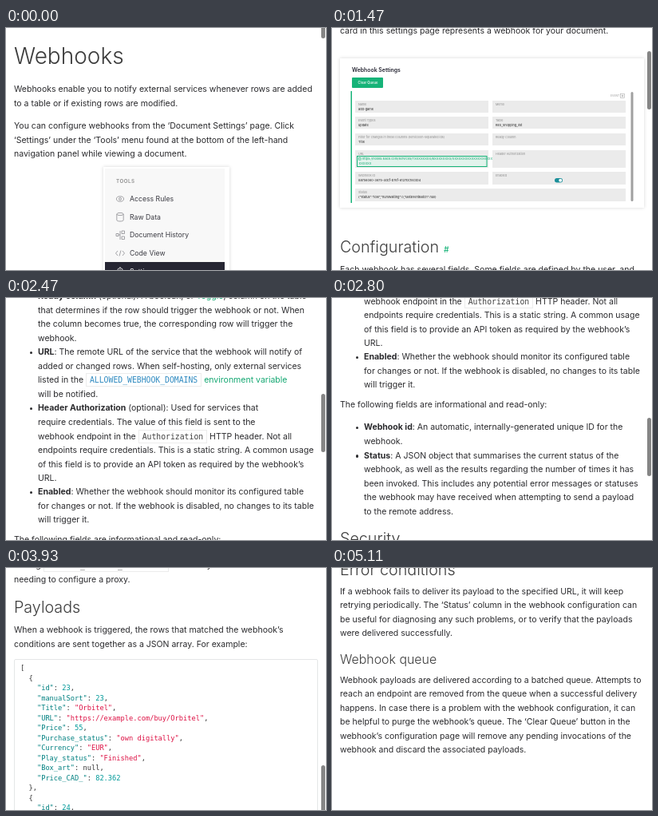
Recreate the animation shown at these times as an HTML page. Size 401 by 303 pixels, loop 5.22 s.

```html
<!DOCTYPE html>
<html lang="en">
<head>
<meta charset="utf-8">
<title>Webhooks</title>
<style>
html, body { margin: 0; width: 100%; height: 100%; overflow: hidden; background: #fff; }
#stage { position: relative; width: 401px; height: 303px; overflow: hidden; background: #fff;
  font: 10.52px/17.6px Inter, "Open Sans", sans-serif; color: #2b2b2e; }
#page { position: absolute; left: 0; top: 0; width: 401px; height: 2660px; will-change: transform; }
#page > * { position: absolute; }
.line { white-space: pre; height: 17.6px; }
.h1, .h2, .h3 { font-weight: 300; color: #3c3c3c; }
.h1 { font-size: 28px; }
.h2 { font-size: 19.7px; }
.h3 { font-size: 15.9px; }
.h2 i { font-size: 10px; font-weight: 500; margin-left: 6px; color: #16b378; }
b { font-weight: 700; }
a { color: #16a873; }
code { font: 9.77px/1 "DejaVu Sans Mono", monospace; color: #404040; padding: 2px 4px;
  border: 1px solid #ececec; background: #fff; }
a code { color: #2f8ac0; }
.dot { width: 3.4px; height: 3.4px; border-radius: 50%; background: #2b2b2e; }
.step { width: 19px; height: 19px; border: 1px solid #16b378; border-radius: 50%;
  color: #16a873; text-align: center; line-height: 19px; }
.pre { box-sizing: border-box; border: 1px solid #e4e6e7; border-radius: 2px; }
.json { font: 8.7px/12.5px "DejaVu Sans Mono", monospace; color: #333; white-space: pre; }
.key { color: #008080; }
.str { color: #d14; }
.num { color: #099; }
svg { overflow: visible; font-family: Inter, "Open Sans", sans-serif; }
.card { filter: drop-shadow(0 0 2px rgba(0,0,0,.16)); }
#thumb { position: absolute; left: 395px; top: 0; width: 5px; height: 73px; border-radius: 2.5px; background: #858585; }
</style>
</head>
<body>
<div id="stage"><div id="page"></div><div id="thumb"></div></div>
<script>
const page = document.getElementById('page');
const thumb = document.getElementById('thumb');
const STEP = 17.57;

function put(cls, left, top, html = '', size) {
  const el = document.createElement('div');
  el.className = cls;
  el.style.left = left + 'px';
  el.style.top = top + 'px';
  if (size) [el.style.width, el.style.height] = size.map(v => v + 'px');
  el.innerHTML = html;
  page.append(el);
}

// y is the vertical middle of the first line
function text(y, lines, x = 10) {
  lines.forEach((s, i) => put('line', x, y + i * STEP - 8.8, s));
}
function item(y, lines) {
  put('dot', 29.5, y - 1.2);
  text(y, lines, 40);
}
function step(y, n, lines) {
  put('step', 15.5, y - 10.5, n);
  text(y, lines, 45);
}
const head = (level, y, s) => put('line h' + level, 10, y - 8.8, s);

function picture(x, y, w, h, body) {
  page.insertAdjacentHTML('beforeend',
    `<svg style="left:${x}px;top:${y}px" width="${w}" height="${h}">${body}</svg>`);
}
const rect = (x, y, w, h, fill, more = '') =>
  `<rect x="${x}" y="${y}" width="${w}" height="${h}" fill="${fill}" ${more}/>`;
const label = (x, y, size, fill, s, more = '') =>
  `<text x="${x}" y="${y + size * .364}" font-size="${size}" fill="${fill}" ${more}>${s}</text>`;

// Introduction
head(1, 35.5, 'Webhooks');
text(77, ['Webhooks enable you to notify external services whenever rows are added',
  'to a table or if existing rows are modified.']);
text(123, ['You can configure webhooks from the ‘Document Settings’ page. Click',
  '‘Settings’ under the ‘Tools’ menu found at the bottom of the left-hand',
  'navigation panel while viewing a document.']);

const icons = [
  '<ellipse cx="143" cy="214" rx="4.5" ry="3.2"/><circle cx="143" cy="214" r="1.5"/>',
  '<ellipse cx="143" cy="233" rx="4.2" ry="1.6"/><path d="M138.800 233v7.500c0 2 8.400 2 8.400 0v-7.500"/>',
  '<path d="M138 257.500h3v3h-3zM145 254h3.500v3.500h-3.500zM145 261h3.500v3.500h-3.500zM141 259h2M143 254v11"/>',
  '<path d="M140 279l-2.500 3 2.500 3M146 279l2.500 3-2.500 3M144 278.500l-2 7"/>',
  '<circle cx="143" cy="304" r="3.4" stroke="#fff"/><circle cx="143" cy="304" r="1.2" stroke="#fff"/><path stroke="#fff" d="M143 299v1.500M143 307.500v1.500M138 304h1.500M146.500 304h1.500"/>'
].join('');
const tools = ['Access Rules', 'Raw Data', 'Document History', 'Code View', 'Settings'];
picture(122, 174, 158, 150, `<g transform="translate(-122 -174)">
  <g class="card">${rect(122, 174, 158, 150, '#fff')}</g>
  ${rect(124, 176, 150, 146, '#f8f8f8')}
  ${label(138, 192, 6.2, '#8c8c8c', 'TOOLS', 'font-weight="600" letter-spacing=".55"')}
  ${rect(124, 293, 150, 22, '#262633')}
  ${tools.map((s, i) => label(155, 214 + i * 22.6, 8.7, i == 4 ? '#fff' : '#3a3a42', s)).join('')}
  <g fill="none" stroke="#8d8d92" stroke-width=".8">${icons}</g></g>`);

text(350, ['At the bottom of the settings page, find the ‘Webhooks’ section and click',
  '‘Manage Webhooks’ to open the list.']);
picture(70, 392, 260, 80, `<g class="card">${rect(0, 0, 260, 80, '#fff')}</g>
  ${label(16, 18, 8.7, '#333', 'Webhooks', 'font-weight="600"')}
  ${rect(16, 34, 228, 1, '#e6e6e6')}
  ${label(16, 53, 8, '#16b378', 'Manage Webhooks')}`);
text(499.4, ['This opens the webhook settings page for the current document. Each',
  'card in this settings page represents a webhook for your document.']);

// Settings picture: column, top, height, name, value
const fields = [
  [0, 91, 15, 'Name', 'add-game'], [1, 91, 15, 'Memo', ''],
  [0, 111, 15, 'Event Types', 'update'], [1, 111, 15, 'Table', 'RES_shopping_list'],
  [0, 132, 15, 'Filter for changes in these columns (semicolon-separated ids)', 'Title'],
  [1, 132, 15, 'Ready Column', ''],
  [0, 153, 22, 'URL', ''], [1, 153, 22, 'Header Authorization', ''],
  [0, 180, 16, 'Webhook Id', '8a756060-3675-4dcf-b7ef-6127bc18c0b4'], [1, 180, 16, 'Enabled', ''],
  [0, 201, 16, 'Status', '{"status":"idle","numWaiting":0,"lastEventBatch":null}']
];
const field = ([col, y, h, name, value]) => {
  const x = col ? 201 : 29;
  return rect(x, y, name == 'Status' ? 339 : 167, h, '#ebebeb') +
    label(x + 4, y + 4.2, 3.7, '#8e8e8e', name) + label(x + 4, y + 11, 3.9, '#262626', value);
};
picture(10, 551, 381, 188, `<g transform="translate(-10 -38)">
  <g class="card">${rect(10, 38, 381, 187, '#fff')}</g>
  ${label(25, 52, 6.9, '#262633', 'Webhook Settings', 'font-weight="600"')}
  ${rect(25, 62, 39, 13, '#16b378', 'rx="1"')}
  ${label(32.5, 68.5, 4.2, '#fff', 'Clear Queue', 'font-weight="500"')}
  ${rect(23.5, 79, 1.5, 140, '#16b378')}
  ${rect(374.5, 80, 3, 137, '#a0a0a0', 'rx="1.500"')}
  ${label(349, 85, 3.4, '#999', 'EVENT')}
  ${rect(361.5, 82.5, 5, 5, 'none', 'stroke="#aaa" stroke-width=".6"')}
  <path d="M364 83.700v2.600M362.700 85h2.600" stroke="#888" stroke-width=".6"/>
  ${fields.map(field).join('')}
  ${rect(31.5, 160.5, 162.5, 13, '#e2f3ec', 'stroke="#16b378"')}
  ${rect(33.5, 162.3, 2.6, 2.8, 'none', 'stroke="#16b378" stroke-width=".6"')}
  ${label(38, 164, 3.9, '#16a873', 'https://hooks.slack.com/services/T' + 'X'.repeat(8) + '/B' + 'X'.repeat(8) + '/' + 'X'.repeat(19))}
  ${label(33.5, 170, 3.9, '#16a873', 'XXXXXX')}
  ${rect(279, 188, 10, 5.4, '#1b8f9a', 'rx="2.700"')}<circle cx="286.200" cy="190.700" r="2" fill="#fff"/></g>`);

// Configuration
head(2, 788, 'Configuration<i>#</i>');
text(816, ['Each webhook has several fields. Some fields are defined by the user, and',
  'other fields are informational and describe the status and the',
  'processing of the webhook. Not all fields are required.']);
item(879, ['<b>Name</b>: A short, descriptive name given to the webhook.']);
item(896.7, ['<b>Memo</b> (optional): A longer description of the webhook’s purpose.']);
item(914.3, ['<b>Event types</b>: Whether adding or modifying rows triggers a webhook.']);
item(932, ['<b>Table</b>: The table that will trigger this webhook.']);
item(949.7, ['<b>Filter for changes in these columns</b> (optional): A semicolon-',
  'separated list of column IDs. If an existing row is edited, the webhook',
  'will trigger only if one of the filtered columns was changed, <em>and</em> if the',
  'webhook is configured to trigger on modification. If a webhook',
  'triggers when adding a row, it does not matter which columns are',
  'defined when the new row is added.']);
item(1055, ['<b>Ready column</b> (optional): A boolean, or <a>Toggle</a>, column on the table',
  'that determines if the row should trigger the webhook or not. When',
  'the column becomes true, the corresponding row will trigger the',
  'webhook.']);
item(1125, ['<b>URL</b>: The remote URL of the service that the webhook will notify of',
  'added or changed rows. When self-hosting, only external services',
  'listed in the <a><code>ALLOWED_WEBHOOK_DOMAINS</code> environment variable</a>',
  'will be notified.']);
item(1195.2, ['<b>Header Authorization</b> (optional): Used for services that',
  'require credentials. The value of this field is sent to the',
  'webhook endpoint in the <code>Authorization</code> HTTP header. Not all',
  'endpoints require credentials. This is a static string. A common usage',
  'of this field is to provide an API token as required by the webhook’s',
  'URL.']);
item(1300, ['<b>Enabled</b>: Whether the webhook should monitor its configured table',
  'for changes or not. If the webhook is disabled, no changes to its table',
  'will trigger it.']);
text(1359.5, ['The following fields are informational and read-only:']);
item(1388, ['<b>Webhook id</b>: An automatic, internally-generated unique ID for the',
  'webhook.']);
item(1423.4, ['<b>Status</b>: A JSON object that summarises the current status of the',
  'webhook, as well as the results regarding the number of times it has',
  'been invoked. This includes any potential error messages or statuses',
  'the webhook may have received when attempting to send a payload',
  'to the remote address.']);

// Security
head(2, 1528, 'Security');
text(1557.4, ['Self-hosted installations may have internal services exposed through',
  'webhooks. There are two ways to mitigate this risk:']);
step(1604, 1, ['Use the <a><code>ALLOWED_WEBHOOK_DOMAINS</code> environment variable</a> to list the',
  'allowed domains that webhooks can use.']);
step(1650, 2, ['Use the <a><code>GRIST_HTTPS_PROXY</code> environment variable</a> to restrict',
  'webhook invocations to go through that proxy, along with setting',
  '<code>ALLOWED_WEBHOOK_DOMAINS=*</code> . In this way, all domains are allowed,',
  'but the webhooks will send requests through the configured proxy,',
  'thus safeguarding your internal Grist endpoints. This is the',
  'configuration that Morvo Labs uses in our cloud-hosted environment.']);
text(1765.3, ['In a trusted environment where malicious users are not expected to exist,',
  'setting <code>ALLOWED_WEBHOOK_DOMAINS=*</code> alone may be sufficient without',
  'needing to configure a proxy.']);

// Payloads
head(2, 1836, 'Payloads');
text(1864, ['When a webhook is triggered, the rows that matched the webhook’s',
  'conditions are sent together as a JSON array. For example:']);
const game = (id, title, price, cad) => ({
  id, manualSort: id, Title: title, URL: 'https://example.com/buy/' + title, Price: price,
  Purchase_status: 'own digitally', Currency: 'EUR', Play_status: 'Finished',
  Box_art: null, Price_CAD_: cad
});
const json = JSON.stringify([game(23, 'Orbitel', 55, 82.362), game(24, 'Dataman', 50, 74.71)], null, 2)
  .replace(/"[^"]*"(?=:)/g, '<u>$&</u>')
  .replace(/: ("[^"\n]*")/g, ': <span class="str">$1</span>')
  .replace(/: ([\d.]+)/g, ': <span class="num">$1</span>')
  .replace(/<u>/g, '<span class="key">').replace(/<\/u>/g, '</span>');
put('pre', 10, 1900, '', [381, 337.5]);
put('json', 18, 1905.2, json);
text(2255, ['Multiple rows can simultaneously trigger the same webhook. In that case,',
  'those rows will be sent together in the same payload. The ‘Ready Column’',
  'in the webhook’s configuration can be useful for gating which rows should',
  'be sent together.']);

// Errors
head(2, 2342, 'Error conditions');
text(2368.3, ['If a webhook fails to deliver its payload to the specified URL, it will keep',
  'retrying periodically. The ‘Status’ column in the webhook configuration can',
  'be useful for diagnosing any such problems, or to verify that the payloads',
  'were delivered successfully.']);
head(3, 2454, 'Webhook queue');
text(2479.3, ['Webhook payloads are delivered according to a batched queue. Attempts to',
  'reach an endpoint are removed from the queue when a successful delivery',
  'happens. In case there is a problem with the webhook configuration, it can',
  'be helpful to purge the webhook’s queue. The ‘Clear Queue’ button in the',
  'webhook’s configuration page will remove any pending invocations of the',
  'webhook and discard the associated payloads.']);

// Scrolling: tick (15 per second), page offset, thumb top
const LOOP = 5220, TICK = 1000 / 15;
const keys = [[1, 0, -60], [22, 513, 29], [31, 854, 85], [42, 1226, 150],
  [52, 1562, 208], [67, 2042, 291], [76, 2339, 342]];

// Gathers speed over the first 13.5 ticks, then runs evenly
const pickUp = x => (x < 13.5 ? x * x / 27 : x - 6.75) / 14.25;

function pose(t) {
  const k = t >= 5108 ? 76 : Math.min(75, Math.max(1, Math.floor((t + 4) / TICK)));
  const i = Math.min(keys.length - 2, keys.findLastIndex(q => q[0] <= k));
  const [a, b] = [keys[i], keys[i + 1]];
  const p = i ? (k - a[0]) / (b[0] - a[0]) : pickUp(k - 1);
  return [1, 2].map(c => Math.round(a[c] + (b[c] - a[c]) * p));
}

const start = performance.now();
function draw() {
  const [y, top] = pose((performance.now() - start) % LOOP);
  page.style.transform = `translateY(${-y}px)`;
  thumb.style.transform = `translateY(${top}px)`;
  requestAnimationFrame(draw);
}
draw();
</script>
</body>
</html>
```
